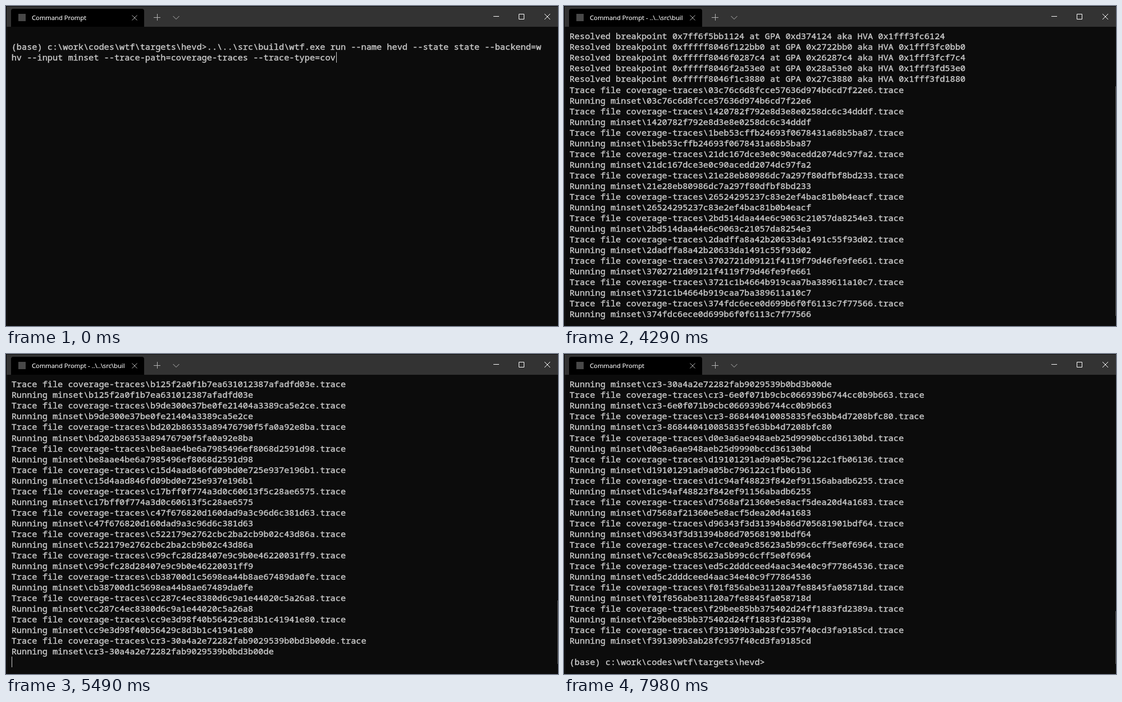
These frames come from a looping animation (983x570 px, 8.1 s). An HTML page:

```html
<!DOCTYPE html>
<html lang="en">
<head>
<meta charset="utf-8">
<title>Terminal run</title>
<style>
  html, body { margin: 0; width: 100%; height: 100%; overflow: hidden; background: #0c0c0c; }
  svg { display: block; }
  #rows {
    font: 500 15.283px "Noto Sans Mono", "DejaVu Sans Mono", monospace;
    font-variant-ligatures: none;
    fill: #ccc; stroke: #ccc; stroke-width: .4;
  }
  #title { font: 11.25px "Open Sans", "Noto Sans", sans-serif; fill: #fff; stroke: #fff; stroke-width: .15; }
  .line { fill: none; stroke: #fff; stroke-width: 1; }
  .soft { stroke: #b4b4b4; }
</style>
</head>
<body>
<svg width="983" height="570" viewBox="0 0 983 570">
  <rect width="983" height="570" fill="#0c0c0c"/>
  <rect width="983" height="1" fill="#111"/>
  <rect x="1" y="1" width="982" height="36" fill="#333"/>
  <rect width="1" height="570" fill="#000"/>
  <rect x="1" y="37" width="1" height="533" fill="#1c1c1c"/>
  <path d="M9 37V9q0-4 4-4H242q4 0 4 4V37Z" fill="#000"/>
  <rect x="22" y="14" width="13" height="13" fill="#484848"/>
  <text id="title" x="46" y="25"></text>
  <path class="line soft" d="M224.5 16.5l9 9m0-9l-9 9M263 20.5h12M269.5 14v12M297.5 18l5.5 5.5 5.5-5.5"/>
  <path class="line" d="M868 18.5h10M913.5 14.5h9v9h-9ZM959 14l10 10m0-10l-10 10"/>
  <g id="rows"></g>
  <rect id="cursor" width="1" height="19" fill="#ccc"/>
  <rect id="thumb" x="982" width="1" fill="#5a5a5a"/>
</svg>
<script>
const LOOP = 8100, ROWS = 27, PITCH = 19.04, CHAR = 9.17;
const TRACK_TOP = 37, TRACK_END = 552;
const $ = id => document.getElementById(id);

const prompt = String.raw`(base) c:\work\codes\wtf\targets\hevd>`;
const command = String.raw`..\..\src\build\wtf.exe run --name hevd --state state --backend=w`;
const commandEnd = "hv --input minset --trace-path=coverage-traces --trace-type=cov";

const breakpoints = `7ff6f5bb1124 d374124 1fff3fc6124
fffff8046f122bb0 2722bb0 1fff3fc0bb0
fffff8046f0287c4 26287c4 1fff3fcf7c4
fffff8046f2a53e0 28a53e0 1fff3fd53e0
fffff8046f1c3880 27c3880 1fff3fd1880`.split("\n").map(s => s.split(" "));

const firstInputs = `03c76c6d8fcce57636d974b6cd7f22e6
1420782f792e8d3e8e0258dc6c34dddf
1beb53cffb24693f0678431a68b5ba87
21dc167dce3e0c90acedd2074dc97fa2
21e28eb80986dc7a297f80dfbf8bd233
26524295237c83e2ef4bac81b0b4eacf
2bd514daa44e6c9063c21057da8254e3
2dadffa8a42b20633da1491c55f93d02
3702721d09121f4119f79d46fe9fe661
3721c1b4664b919caa7ba389611a10c7
374fdc6ece0d699b6f0f6113c7f77566
38fa4a605b49e32e0f6dddae62600ebc
392265b6a663d6a9e5de5bf8e07c6867
3df83736bd19db7dcb7c56599463dfba
3e503ee86af264fb24bd300e021f77a4
41ce19c5c54be408d78aa40d97bdb233
42212219f706ba99e8136f1a1c91c6fc
4498090efa3ae659b3f54d8b79888f48
458e9e3728a2f512b5baacf86601cc46
4dcb75bdafa97a0fe774dd58dec1312c
4eb1f30cc7387eeaad7c9b575ce4fcc5
5246b9013ee7050e17fa83928e899e90
5a1dda6e51a914c1c889b63e5a1887e3`.split("\n");

const lastInputs = `b125f2a0f1b7ea631012387afadfd03e
b9de300e37be0fe21404a3389ca5e2ce
bd202b86353a89476790f5fa0a92e8ba
be8aae4be6a7985496ef8068d2591d98
c15d4aad846fd09bd0e725e937e196b1
c17bff0f774a3d0c60613f5c28ae6575
c47f676820d160dad9a3c96d6c381d63
c522179e2762cbc2ba2cb9b02c43d86a
c99cfc28d28407e9c9b0e46220031ff9
cb38700d1c5698ea44b8ae67489da0fe
cc287c4ec8380d6c9a1e44020c5a26a8
cc9e3d98f40b56429c8d3b1c41941e80
cr3-30a4a2e72282fab9029539b0bd3b00de
cr3-6e0f071b9cbc066939b6744cc0b9b663
cr3-868440410085835fe63bb4d7208bfc80
d0e3a6ae948aeb25d9990bccd36130bd
d19101291ad9a05bc796122c1fb06136
d1c94af48823f842ef91156abadb6255
d7568af21360e5e8acf5dea20d4a1683
d96343f3d31394b86d705681901bdf64
e7cc0ea9c85623a5b99c6cff5e0f6964
ed5c2dddceed4aac34e40c9f77864536
f01f856abe31120a7fe8845fa058718d
f29bee85bb375402d24ff1883fd2389a
f391309b3ab28fc957f40cd3fa9185cd`.split("\n");

// Inputs that only flash past: rising first byte, seeded random tail
let seed = 7;
const randomHex = () => {
  seed = (seed * 1103515245 + 12345) % 2147483648;
  return (seed >> 16 & 15).toString(16);
};
const middleInputs = Array.from({ length: 19 }, (_, i) =>
  (0x5c + Math.floor(i * 4.4)).toString(16) + Array.from({ length: 30 }, randomHex).join(""));

const log = [
  "", prompt + command, commandEnd,
  "Initializing the debugger instance.. (this takes a bit of time)",
  "Setting debug register status to zero.",
  "Setting debug register status to zero.",
  "Setting mxcsr_mask to 0xffbf.",
  ...breakpoints.map(([va, gpa, hva]) => `Resolved breakpoint 0x${va} at GPA 0x${gpa} aka HVA 0x${hva}`),
  ...[...firstInputs, ...middleInputs, ...lastInputs].flatMap(name =>
    ["Trace file coverage-traces\\" + name + ".trace", "Running minset\\" + name]),
  "", prompt
];

// [time, lines printed]
const steps = [
  [0, 3], [1000, 4],
  [3800, 7], [3870, 9], [3940, 12], [4010, 14], [4080, 18], [4150, 22],
  [4220, 28], [4290, 34], [4360, 38], [4430, 44], [4550, 52],
  [4940, 57], [5020, 62], [5080, 70],
  [5280, 80], [5350, 92], [5420, 106], [5490, 122], [5550, 130], [5620, 138], [5690, 146],
  [6230, log.length]
];
const blinks = [200, 800, 1660, 2210, 2730, 3270, 3800, 4360, 5080, 5490, 6090, 6630, 7160, 7760, 7980];

// Line counts at which the cursor is still on the last printed line
const sameLine = new Set([3, 34, 57, log.length]);
const cursorCol = { 3: commandEnd.length, [log.length]: prompt.length };

const rows = Array.from({ length: ROWS }, (_, i) => {
  const text = document.createElementNS("http://www.w3.org/2000/svg", "text");
  text.setAttribute("x", 9.7);
  text.setAttribute("y", (59.3 + i * PITCH).toFixed(2));
  return $("rows").appendChild(text);
});

const setText = (el, s) => { if (el.textContent !== s) el.textContent = s; };
const setAttrs = (el, attrs) => { for (const k in attrs) el.setAttribute(k, attrs[k]); };

function draw(t) {
  const count = steps.filter(s => s[0] <= t).pop()[1];
  const total = count + (sameLine.has(count) ? 0 : 1);
  const top = Math.max(0, total - ROWS);
  rows.forEach((el, i) => setText(el, top + i < count ? log[top + i] : ""));

  const busy = t >= 1000 && t < 6300;
  setText($("title"), "Command Prompt" + (busy ? " - ..\\..\\src\\buil" : ""));

  const on = blinks.filter(b => b <= t).length % 2 === 0;
  setAttrs($("cursor"), {
    x: Math.floor(10.4 + (cursorCol[count] || 0) * CHAR),
    y: Math.round(44.4 + (total - 1 - top) * PITCH),
    visibility: on ? "visible" : "hidden"
  });

  const size = Math.round((TRACK_END - TRACK_TOP) * Math.min(1, ROWS / total));
  setAttrs($("thumb"), {
    y: TRACK_END - size,
    height: size,
    visibility: top > 0 ? "visible" : "hidden"
  });
}

const start = performance.now();
function tick() {
  draw((performance.now() - start) % LOOP);
  requestAnimationFrame(tick);
}
tick();
</script>
</body>
</html>
```
